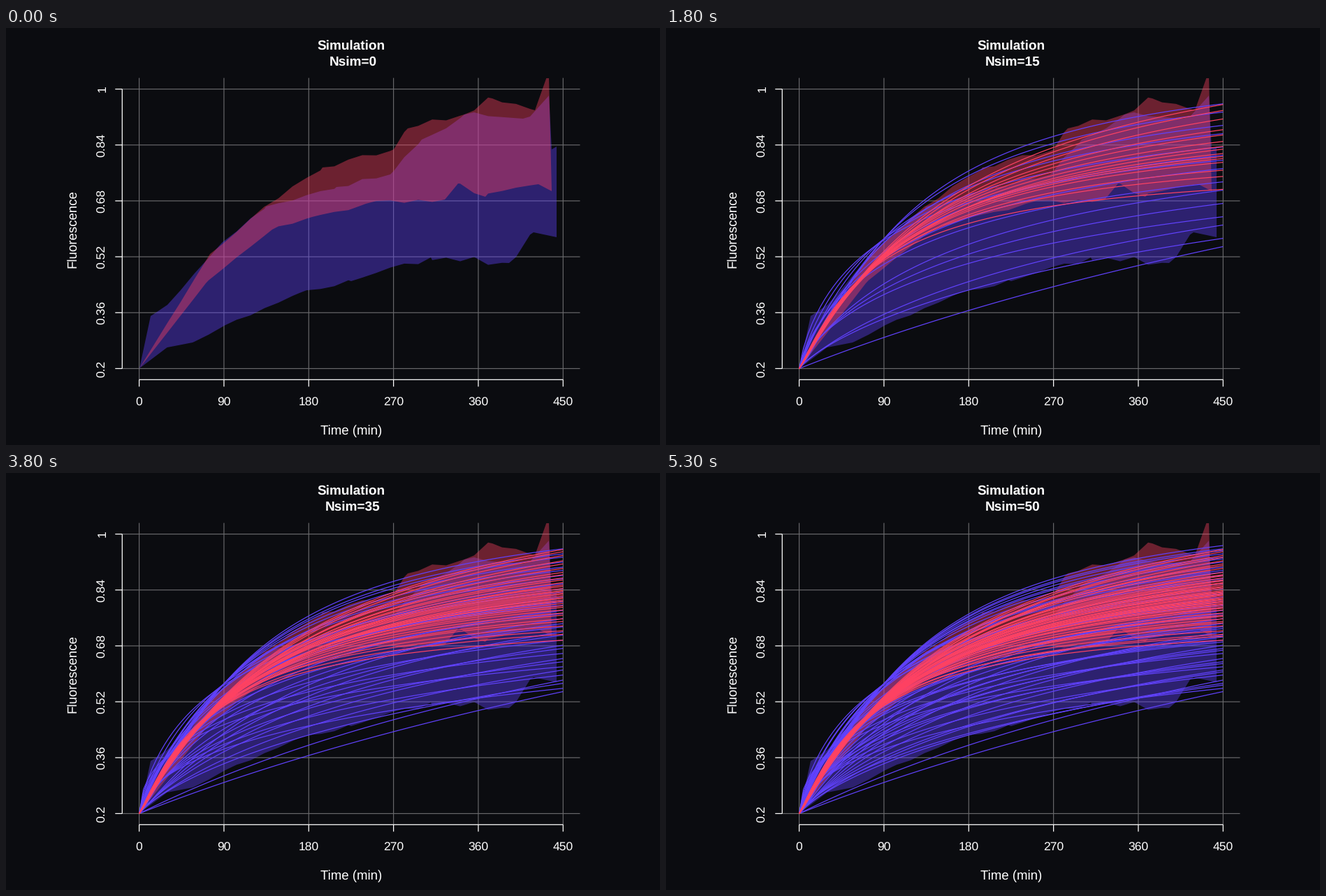
A matplotlib script that plays this animation: 936x598 px, repeating every 5.4 s.

```python
import numpy as np
import matplotlib.pyplot as plt
from matplotlib.animation import FuncAnimation
from matplotlib.patches import Polygon, Rectangle

W, H, DPI = 936, 598, 100
PX = 72 / DPI
BG, INK, GRID = "#0b0c10", "#ffffff", "#6b6b6e"
BLUE, RED = "#6142ff", "#ff4262"
LEFT, RIGHT, TOP, BOTTOM = 166.3, 821.5, 71.6, 504.3
X0, X1, Y0, Y1 = 190.6, 797.3, 488.4, 87.6
FRAMES, HOLD, STEP_MS = 54, 3, 100
RUNS = FRAMES - HOLD - 1

plt.rcParams["font.family"] = "Liberation Sans"
plt.rcParams["text.hinting"] = "none"
fig = plt.figure(figsize=(W / DPI, H / DPI), dpi=DPI, facecolor=BG)
ax = fig.add_axes([0, 0, 1, 1])
ax.set(xlim=(0, W), ylim=(H, 0))
ax.axis("off")
rng = np.random.default_rng(4)


def stroke(xs, ys, color, width, zorder):
    line, = ax.plot(xs, ys, color=color, lw=width * PX, zorder=zorder,
                    solid_capstyle="butt", solid_joinstyle="round", snap=False)
    return line


def label(x, y, text, size, **kw):
    return ax.text(x, y, text, color=INK, fontsize=size * PX, ha="center",
                   va="baseline", rotation_mode="anchor", zorder=9, **kw)


def draw_axes():
    for i in range(6):
        x = X0 + (X1 - X0) * i / 5
        y = Y0 + (Y1 - Y0) * i / 5
        stroke([x, x], [TOP, BOTTOM], GRID, 1.15, 1)
        stroke([LEFT, RIGHT], [y, y], GRID, 1.15, 1)
        stroke([x, x], [BOTTOM, BOTTOM + 10], INK, 1.25, 8)
        stroke([LEFT - 10, LEFT], [y, y], INK, 1.25, 8)
        label(x, 542.3, str(90 * i), 17.5)
        label(142.3, y, f"{0.2 + 0.16 * i:.2g}", 17.5, rotation=90)
    stroke([X0, X1], [BOTTOM, BOTTOM], INK, 1.25, 8)
    stroke([LEFT, LEFT], [Y0, Y1], INK, 1.25, 8)
    label(493.9, 583.3, "Time (min)", 18.7)
    label(100.5, 287.6, "Fluorescence", 18.7, rotation=90)
    label(493.9, 30.8, "Simulation", 19, weight="bold")


def jagged(corners):
    """Join the corners, with small random teeth that grow to the right."""
    corner_x, corner_y = np.transpose(corners)
    teeth_x = np.arange(210, 770, 20)
    teeth_y = np.interp(teeth_x, corner_x, corner_y)
    teeth_y += rng.uniform(-7, 7, teeth_x.size) * (teeth_x - X0) / (X1 - X0)
    points = list(corners) + list(zip(teeth_x, teeth_y))
    return sorted(points, key=lambda p: p[0])


def draw_band(upper, lower, color, zorder):
    band = Polygon(jagged(upper) + jagged(lower)[::-1], closed=True, fc=color,
                   ec="none", alpha=0.4, zorder=zorder)
    ax.add_patch(band)
    band.set_clip_path(Rectangle((LEFT, TOP), RIGHT - LEFT, BOTTOM - TOP,
                                 transform=ax.transData))


def draw_bands():
    draw_band([(191, 488), (207, 413), (231, 397), (308, 309), (372, 256),
               (473, 228), (555, 205), (595, 160), (656, 124), (740, 130),
               (777, 97), (781, 174), (788, 170)],
              [(191, 488), (231, 458), (267, 451), (312, 427), (420, 380),
               (494, 363), (608, 329), (720, 337), (755, 293), (788, 300)],
              BLUE, 2)
    draw_band([(191, 488), (292, 324), (372, 255), (453, 200), (555, 174),
               (575, 144), (656, 124), (696, 101), (757, 118), (774, 70),
               (777, 70), (781, 234)],
              [(191, 488), (286, 366), (381, 289), (438, 271), (515, 252),
               (628, 246), (647, 223), (686, 242), (762, 224), (781, 234)],
              RED, 3)


TIME = np.linspace(0, 1, 100)
CURVE_X = X0 + (X1 - X0) * TIME


def hill_curve(rise_end, rise_90, k):
    """Saturating Hill curve through the rises at 90 and 450 min."""
    q = rise_end / rise_90
    half = (q - 1) / (5 ** k - q)
    s = TIME ** k
    return Y0 - rise_end * (1 + half) * s / (half + s)


def blue_curve(i):
    # Irrational steps spread the end levels and the bends evenly.
    rise = Y0 - 104 - 212 * ((0.37 + 0.618 * i) % 1)
    steepest, bend = 0.62, (0.6 + 0.4142 * i) % 1
    flattest = rise / 700
    rise_90 = min(186, rise * (flattest + (steepest - flattest) * bend))
    ratio = rise_90 / rise
    k = max(0.835 - 1.65 * ratio + 0.0033 * rise,
            0.05 - np.log(ratio) / np.log(5))
    return hill_curve(rise, rise_90, k)


def red_curve(i):
    # The cubic term gathers the end levels around the middle.
    d = 2 * ((0.01 + 0.618 * i) % 1) - 1
    rise = Y0 - 175 + 34 * -(d + d ** 3)
    rise_90 = 158.5 + 0.08 * (rise - 290) + rng.uniform(-3, 3)
    return hill_curve(rise, rise_90, 1.1)


draw_axes()
draw_bands()
runs = [(stroke(CURVE_X, blue_curve(i), BLUE, 1.2, 4),
         stroke(CURVE_X, red_curve(i), RED, 1.2, 5)) for i in range(RUNS)]
counter = label(496.5, 54, "Nsim=0", 19, weight="bold")


def update(frame):
    count = max(0, frame - HOLD)
    counter.set_text(f"Nsim={count}")
    for i, pair in enumerate(runs):
        for line in pair:
            line.set_visible(i < count)
    return [counter]


anim = FuncAnimation(fig, update, frames=FRAMES, interval=STEP_MS,
                     repeat=True, repeat_delay=0, blit=False)
plt.show()
```
